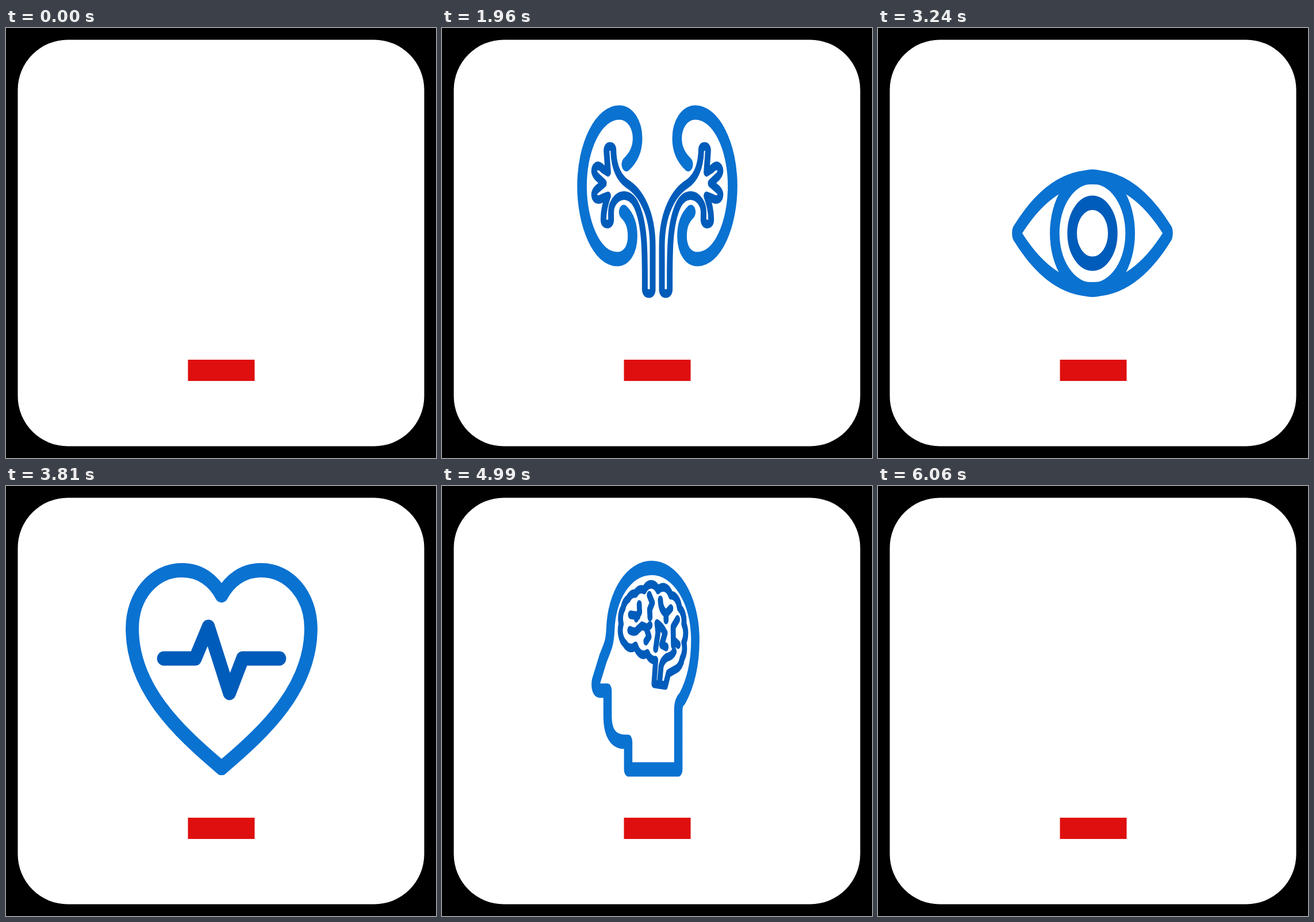
Write an HTML page that moves like this. It is 748 px wide and 748 px high and loops after 6.13 s.

```html
<!DOCTYPE html>
<html lang="en">
<head>
<meta charset="utf-8">
<title>Medical icons</title>
<style>
  html, body { margin: 0; width: 100%; height: 100%; overflow: hidden; background: #000; }
  svg { display: block; width: 100vw; height: 100vh; }
  #icons { fill: none; stroke: #0a72d1; stroke-width: 25; stroke-linecap: round; stroke-linejoin: round; }
  .dark { stroke: #005cba; }
  .thin { stroke-width: 15; }
  .solid { fill: #0a72d1; stroke: none; }
  .core { fill: #005cba; stroke: none; }
</style>
</head>
<body>
<svg viewBox="0 0 748 748">
  <rect x="20.5" y="20.5" width="707" height="707" rx="87" fill="#fff"/>
  <rect x="316.5" y="577" width="116" height="37" fill="#df0f0f"/>
  <g id="icons"></g>
</svg>
<script>
const LOOP = 6130, STEP = 30, STEPS = 12;
const TURN = STEP * STEPS, LEAVE = 500;

const path = (d, cls = '') => `<path class="${cls}" d="${d}"/>`;
const ring = (x, y, r, cls = '') => `<circle class="${cls}" cx="${x}" cy="${y}" r="${r}"/>`;
const mirrored = (part, c) => `${part}<g transform="matrix(-1 0 0 1 ${2 * c} 0)">${part}</g>`;

const stethoscope =
  ring(274, 158, 24, 'solid') + ring(350.5, 158, 24, 'solid') +
  path('M268 160C242 168 229 186 229 210V301A84 84 0 0 0 397 301V210C397 186 384 168 358 160') +
  path('M313 390V411A84 84 0 0 0 481 411V308') +
  ring(481, 259, 39.5) + ring(481, 259, 15, 'core');

const bone =
  path('M340 257A52 52 0 1 1 373 183A52 52 0 1 1 406 257V387A52 52 0 1 1 373 461A52 52 0 1 1 340 387Z') +
  path('M373 290V354', 'dark thin');

const kidneys = mirrored(
  path('M287 320C304 331 310 345 310 362C310 386 294 402 270 402C216 402 178 340 178 275' +
       'C178 205 222 147 275 147C304 147 323 168 323 192C323 210 313 225 294 237') +
  path('M342 455C342 395 344 340 318 306C303 288 276 286 260 304C252 313 254 322 254 334' +
       'Q253 341 244 341Q234 341 234 333C234 318 239 306 246 292L234 295Q217 302 211 294' +
       'Q207 287 216 281L235 270L216 258Q206 250 212 243Q220 236 232 245L246 251L242 214' +
       'Q242 206 251 206Q260 206 260 213C261 240 273 260 296 271C330 285 362.5 320 362.5 380' +
       'V455Q362 462 352.5 462Q343 462 342 455Z', 'dark thin'), 374.5);

const eye =
  path('M176.5 353C230 295 295 259.5 373 259.5S516 295 569.5 353Q571 357 569.5 361' +
       'C516 419 451 454.5 373 454.5S230 419 176.5 361Q175 357 176.5 353Z') +
  ring(373, 357, 98.5) + ring(373, 357, 53, 'dark');

const heart =
  mirrored(path('M375 490.5C290 425 205.5 350 205.5 248C205.5 190 247 146.5 300 146.5C335 146.5 360 165 375 190'), 375) +
  path('M265 300H325L350 245L390 360L415 300H485', 'dark');

// Outline of the brain: bumps between these points
const lobes = [[359, 291], [335, 290], [324, 278], [292, 274], [281, 240], [287, 212], [302, 196],
  [324, 187], [350, 181], [391, 181], [429, 190], [455, 212], [468, 240], [468, 272], [463, 300], [446, 318]];
const folds = 'M335 206L336 219L326 230M309 224L331 226M365 190L374 203L366 215L367 228' +
  'M398 198Q399 216 415 222V233M429 213L415 222M307 251Q324 256 330 250L343 243L359 247L367 242' +
  'M356 247L364 262L355 270M384 283Q387 270 391 255L388 239Q402 244 412 256L402 276L415 280' +
  'M449 232L436 245L437 277M437 268L451 276' +
  'M439 288Q433 296 417 298Q403 304 400 314L396 340';

const head =
  path('M206 340L227 300C240 280 247 275 249 250C252 190 304 142.5 372.5 142.5' +
       'C441 142.5 502 195 502 268C502 305 491 340 463 370Q451.5 376 451.5 390V493H302V445H292' +
       'C258 445 240.5 430 240.5 400V356H216Q202 354 206 340Z') +
  path('M379 344L384 303' + lobes.map(([x, y]) => `A26 26 0 0 1 ${x} ${y}`).join('') +
       'L422 326L413 347Z' + folds, 'dark thin');

const tooth =
  mirrored(path('M374.5 165C340 150 320 138.5 295 138.5C255 138.5 228.5 172 228.5 220' +
    'C228.5 280 262 310 270 370C277 430 285 492.5 310 492.5C345 492.5 335 375 374.5 375'), 374.5) +
  path('M275 222Q275 187 305 184', 'dark thin');

// Art, start time, turning axis
const cast = [
  [stethoscope, 0, 374.5],
  [bone, 860, 373],
  [kidneys, 1720, 374.5],
  [eye, 2620, 373],
  [heart, 3480, 375],
  [head, 4340, 354.5],
  [tooth, 5200, 374.5]
];

const box = document.getElementById('icons');
box.innerHTML = cast.map(([art]) => `<g display="none">${art}</g>`).join('');
const icons = cast.map(([, start, axis], i) => ({ el: box.children[i], start, axis }));

// Number of turning steps an icon is open, 0 to 12
function openness(t) {
  if (t < 0 || t >= LEAVE + TURN) return 0;
  if (t < TURN) return Math.floor(t / STEP);
  return t < LEAVE ? STEPS : STEPS - Math.floor((t - LEAVE) / STEP);
}

function draw(t) {
  for (const { el, start, axis } of icons) {
    const k = openness(t - start), s = k / STEPS;
    el.setAttribute('display', k ? 'inline' : 'none');
    el.setAttribute('transform', `matrix(${s} 0 0 1 ${axis * (1 - s)} 0)`);
    el.setAttribute('opacity', Math.min(1, s * 3));
  }
}

function tick() {
  draw(performance.now() % LOOP);
  requestAnimationFrame(tick);
}
tick();
</script>
</body>
</html>
```
